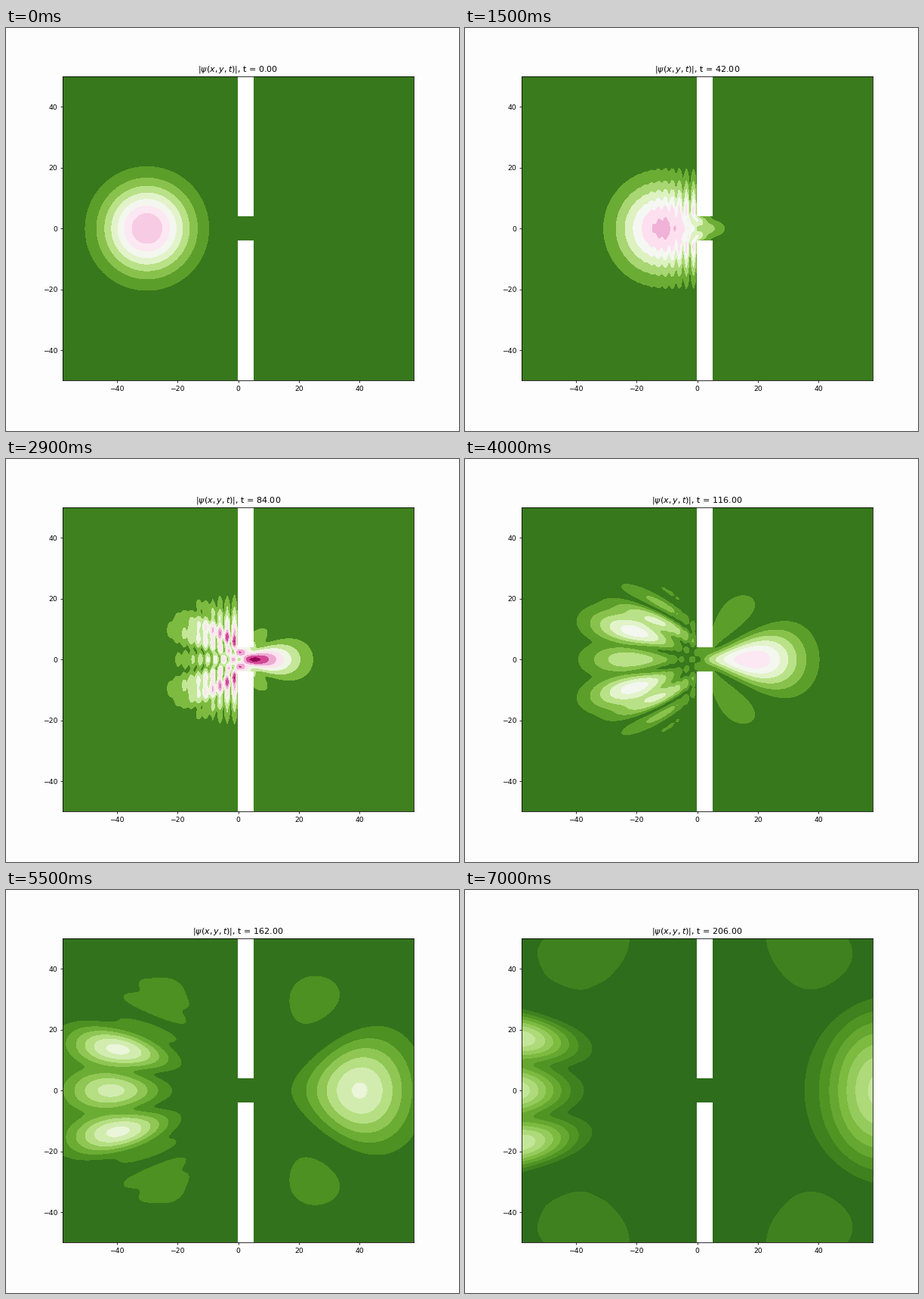
A matplotlib script for the animation above (7100 ms loop, 600 px wide and 533 px high).

```python
"""Wave packet hitting a screen with a single slit (2D Schrodinger equation)."""
import numpy as np
import matplotlib.pyplot as plt
from matplotlib.animation import FuncAnimation
from matplotlib.patches import Rectangle

# Physics, with hbar = 1
MASS, K0 = 3.0, 1.342
START_X, WIDTH, PEAK = -30.0, 10.0, 0.158
SCREEN_DEPTH, HALF_GAP = 1.0, 4.75

# Numerical grid, larger than the view so that nothing bounces back
DX, DT = 0.6, 0.2
STEPS = 10                      # time steps per stored state
TIME_UNIT = STEPS * DT
CELLS_X, CELLS_Y = 167, 134     # on each side of the origin

# Picture
W, H, DPI = 600, 533, 72
FRAMES, INTERVAL = 71, 100
VIEW_X, VIEW_Y = 57.78, 50
VMAX = 0.23
WALL_LEFT, WALL_RIGHT, SLIT = -0.12, 5.05, 4.0

x = DX * np.arange(-CELLS_X, CELLS_X + 1)
y = DX * np.arange(-CELLS_Y, CELLS_Y + 1)
X, Y = np.meshgrid(x, y)
blocked = (np.abs(Y) > HALF_GAP) & (X > -DX / 2) & (X < SCREEN_DEPTH)
free = (~blocked).astype(float)


def hamiltonian(f):
    """Kinetic energy, fourth-order stencil; the screen is impenetrable."""
    mid = f[2:-2, 2:-2]
    near = f[1:-3, 2:-2] + f[3:-1, 2:-2] + f[2:-2, 1:-3] + f[2:-2, 3:-1]
    far = f[:-4, 2:-2] + f[4:, 2:-2] + f[2:-2, :-4] + f[2:-2, 4:]
    out = np.zeros_like(f)
    out[2:-2, 2:-2] = (60 * mid - 16 * near + far) / (24 * MASS * DX**2)
    return out * free


def advance(re, im):
    """Leapfrog over one time unit; both parts end at the same time."""
    im -= DT / 2 * hamiltonian(re)
    for _ in range(STEPS):
        re += DT * hamiltonian(im)
        im -= DT * hamiltonian(re)
    im += DT / 2 * hamiltonian(re)


def simulate(count):
    """|psi| inside the view at multiples of the time unit."""
    envelope = PEAK * np.exp(-((X - START_X)**2 + Y**2) / (2 * WIDTH**2)) * free
    re, im = envelope * np.cos(K0 * X), envelope * np.sin(K0 * X)
    states = []
    for i in range(count):
        if i:
            advance(re, im)
        states.append(np.hypot(re, im)[view])
    return states


def state_index(frame):
    return max(0, 3 * (frame - 1) // 2)


view = np.ix_(np.abs(y) <= VIEW_Y + DX, np.abs(x) <= VIEW_X + DX)
states = simulate(state_index(FRAMES - 1) + 1)

plt.rcParams["font.size"] = 9.26
fig = plt.figure(figsize=(W / DPI, H / DPI), dpi=DPI, facecolor="#fefdfe")
ax = fig.add_axes([0.125, 0.125, 0.775, 0.755])
ax.set_xlim(-VIEW_X, VIEW_X)
ax.set_ylim(-VIEW_Y, VIEW_Y)
ax.set_xticks(range(-40, 41, 20))
ax.set_yticks(range(-40, 41, 20))
ax.tick_params(length=3.24)
for bottom in (-VIEW_Y, SLIT):
    ax.add_patch(Rectangle((WALL_LEFT, bottom), WALL_RIGHT - WALL_LEFT,
                           VIEW_Y - SLIT, fc="white", lw=0, zorder=1.5))
title = ax.set_title("")
shown = []


def update(frame):
    while shown:
        shown.pop().remove()
    i = state_index(frame)
    shown.append(ax.contourf(X[view], Y[view], states[i],
                             cmap="PiYG_r", vmin=0, vmax=VMAX))
    ax.set_xlim(-VIEW_X, VIEW_X)
    ax.set_ylim(-VIEW_Y, VIEW_Y)
    title.set_text(rf"$|\psi(x,y,t)|$, t = {i * TIME_UNIT:.2f}")
    return [*shown, title]


anim = FuncAnimation(fig, update, frames=FRAMES, interval=INTERVAL,
                     init_func=lambda: update(0), repeat=True, repeat_delay=0)
plt.show()
```
